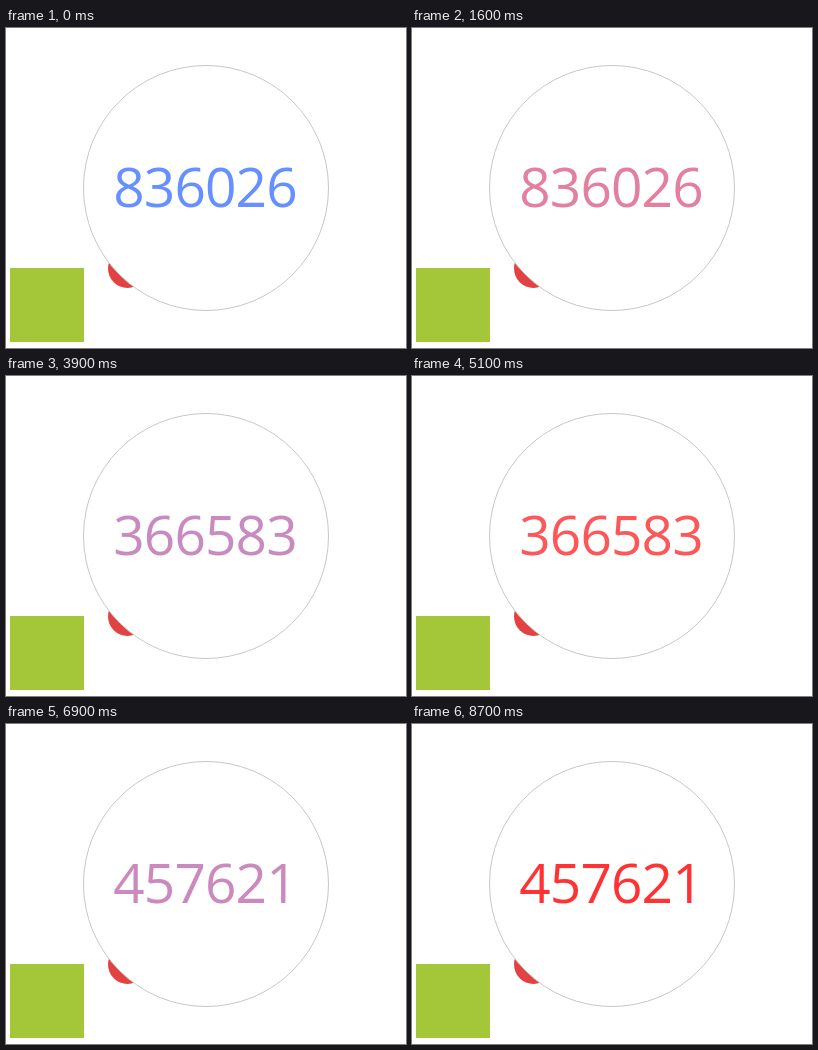
Recreate the animation shown at these times as an HTML page. Size 400 by 320 pixels, loop 8800 ms.

```html
<!DOCTYPE html>
<html lang="en">
<head>
<meta charset="utf-8">
<title>One-time code</title>
<style>
  html, body { margin: 0; width: 100%; height: 100%; overflow: hidden; background: #fff; }
  svg { display: block; width: 400px; height: 320px; }
  text { font: 400 55px "Open Sans", "Noto Sans", sans-serif; letter-spacing: -.85px; }
</style>
</head>
<body>
<svg viewBox="0 0 400 320">
  <rect x="4" y="240" width="74" height="74" fill="#a4c639"/>
  <circle cx="121.5" cy="240.5" r="19.5" fill="#e24242"/>
  <circle cx="200" cy="160" r="122.5" fill="#fff" stroke="#c8c8c8"/>
  <text id="code" x="107.2" y="178.7"></text>
</svg>
<script>
const LOOP = 8800, STEP = 100;
const label = document.getElementById('code');

// Each code fades from blue to red between start and end.
const codes = [
  { text: '836026', start: 200, end: 2700 },
  { text: '366583', start: 2800, end: 5500 },
  { text: '457621', start: 5600, end: 8700 }
];

const mix = (a, b, k) => Math.round(a + (b - a) * k);

// Red rises early, blue falls steadily, green falls late.
function colourAt(p) {
  const r = mix(102, 255, 1 - (1 - p) ** 2);
  const g = mix(144, 51, p ** 3);
  const b = mix(255, 51, p ** 1.3);
  return `rgb(${r}, ${g}, ${b})`;
}

function draw(time) {
  const t = Math.floor(time / STEP) * STEP;
  const code = codes.findLast(c => c.start <= t) || codes[0];
  const p = (t - code.start) / (code.end - code.start);
  if (label.textContent !== code.text) label.textContent = code.text;
  label.setAttribute('fill', colourAt(Math.min(1, Math.max(0, p))));
}

const begin = performance.now();
function frame() {
  draw((performance.now() - begin) % LOOP);
  requestAnimationFrame(frame);
}
frame();
</script>
</body>
</html>
```
